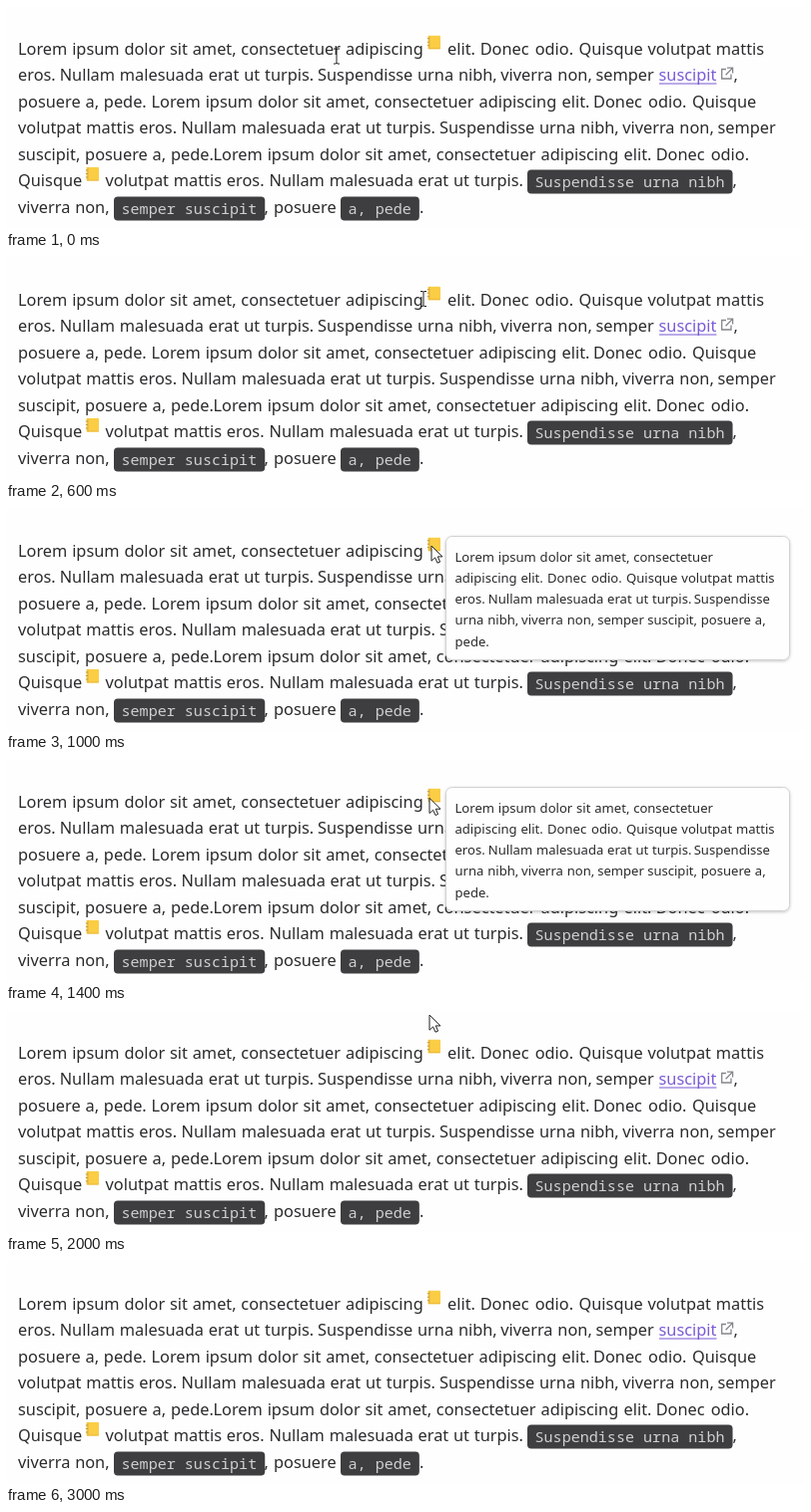
Recreate the animation shown at these times as an HTML page. Size 800 by 224 pixels, loop 3.2 s.

```html
<!DOCTYPE html>
<html lang="la">
<head>
<meta charset="utf-8">
<style>
  html, body { margin: 0; width: 100%; height: 100%; overflow: hidden; background: #fefefe; }
  svg { display: block; width: 800px; height: 224px; }
  text { white-space: pre; }
  .body { font: 16.34px "Noto Sans", "Open Sans", sans-serif; word-spacing: .57px; fill: #2b2b2d; }
  .link { fill: #7b5bd6; }
  .code { font: 15.08px "Noto Sans Mono", "DejaVu Sans Mono", monospace; fill: #d0d0d2; }
  .tip { font: 13.07px "Noto Sans", "Open Sans", sans-serif; word-spacing: .46px; fill: #2b2b2d; }
</style>
</head>
<body>
<svg viewBox="0 0 800 224" xmlns="http://www.w3.org/2000/svg">
  <defs>
    <filter id="shadow" x="-10%" y="-10%" width="120%" height="125%">
      <feDropShadow dx="0" dy="1" stdDeviation="1.6" flood-color="#000" flood-opacity=".22"/>
    </filter>
    <g id="notebook">
      <rect x="1.5" width="12.5" height="13.5" rx=".8" fill="#facd45"/>
      <path d="M2 13H13.8" stroke="#eab83c"/>
      <path d="M3 .3V13.2" stroke="#e6b03a"/>
      <path d="M.8 3H3M.8 6.5H3M.8 10H3" stroke="#b59a62"/>
    </g>
  </defs>
  <rect width="800" height="224" fill="#fefefe"/>
  <g id="page"></g>
  <path d="M654 78H711.5" stroke="#7b5bd6" stroke-width="1.2"/>
  <path d="M721 63.5H716.7V73H726V68.5M722 62.2H727.6V67.6M727.4 62.4L720.6 69.2" fill="none" stroke="#85858a" stroke-width="1.3"/>
  <use href="#notebook" x="421" y="29.7"/>
  <use href="#notebook" x="79" y="162"/>
  <g id="tooltip">
    <rect x="440.5" y="28.5" width="344" height="124" rx="6" fill="#fefefe" stroke="#d2d2d4" filter="url(#shadow)"/>
  </g>
  <g id="ibeam" fill="none" stroke="#222">
    <path d="M-3 -7.5H-1L0 -6.7L1 -7.5H3M0 -6.7V6.7M-3 7.5H-1L0 6.7L1 7.5H3"/>
  </g>
  <path id="arrow" d="M0 0V15.2L3.6 11.9L6 17.2L8.6 16.1L6.3 10.9H11Z" fill="#fff" stroke="#222" stroke-width="1"/>
</svg>
<script>
const LOOP = 3200, STEP = 200;
const TIP_SCALE = 0.8;
const $ = id => document.getElementById(id);

function add(parent, tag, attrs, content = "") {
  const node = document.createElementNS("http://www.w3.org/2000/svg", tag);
  for (const key in attrs) node.setAttribute(key, attrs[key]);
  node.textContent = content;
  parent.append(node);
}

// Repeated phrases as runs of [offset, text]; at() moves one to its place.
const at = (x, phrase) => phrase.map(([offset, content]) => [x + offset, content]);
const lorem = [[0, "Lorem ipsum dolor sit amet,"], [223.3, "consectetuer"], [328, "adipiscing"]];
const loremElit = [...lorem, [411, "elit."]];
const donec = [[0, "Donec"], [55, "odio."]];
const nullam = [[0, "Nullam malesuada"], [149, "erat ut turpis."]];
const suspendisse = [[0, "Suspendisse"], [100, "urna nibh,"], [183.2, "viverra non,"], [278.4, "semper"]];

// Each line holds runs of [x, text, class].
const lines = [
  [...at(12, lorem), [442, "elit."], ...at(474.7, donec), [573.5, "Quisque volutpat mattis"]],
  [[12, "eros."], ...at(53.7, nullam), ...at(312, suspendisse), [653.5, "suscipit", "link"], [728.5, ","]],
  [[12, "posuere a, pede."], ...at(145.5, loremElit), ...at(588, donec), [687, "Quisque"]],
  [[12, "volutpat mattis eros."], ...at(175.5, nullam), ...at(434, suspendisse)],
  [[12, "suscipit, posuere a, pede."], ...at(207.5, loremElit), ...at(650.7, donec)],
  [[12, "Quisque"], [99.5, "volutpat mattis eros."], ...at(263.5, nullam),
   [529.5, "Suspendisse urna nibh", "code"], [727.5, ","]],
  [[12, "viverra non,"], [115.5, "semper suscipit", "code"], [258.5, ","],
   [268, "posuere"], [342.5, "a, pede", "code"], [414, "."]]
];

lines.forEach((runs, row) => {
  const baseline = 49 + Math.round(row * 26.45);
  for (const [x, content, kind = ""] of runs) {
    const isCode = kind === "code";
    const y = baseline + (isCode ? 1 : 0);
    if (isCode) {
      add($("page"), "rect", { x: x - 7.5, y: y - 17.5, width: content.length * 9.05 + 15.5, height: 24, rx: 4, fill: "#3e3e40" });
    }
    add($("page"), "text", { x, y, class: isCode ? "code" : "body " + kind }, content);
  }
});

// Tooltip offsets are in body size and scaled down together with the type.
const tipLines = [
  lorem.slice(0, 2),
  [[0, "adipiscing elit."], ...at(115.7, donec), [214.5, "Quisque volutpat mattis"]],
  [[0, "eros."], ...at(41.7, nullam), [299, "Suspendisse"]],
  [...at(-100, suspendisse.slice(1)), [240.8, "suscipit, posuere a,"]],
  [[0, "pede."]]
];

tipLines.forEach((runs, row) => {
  const y = 54 + Math.round(row * 21.15);
  for (const [x, content] of runs) {
    add($("tooltip"), "text", { x: 449.5 + x * TIP_SCALE, y, class: "tip" }, content);
  }
});

// Pointer keys: [step, x, y]; it leaves through the top edge after the last one.
const pointer = [[0, 331, 50.5], [1, 387, 48.5], [2, 411, 44], [3, 418, 42],
                 [4, 426, 37], [5, 426, 38], [8, 423, 40], [9, 422, 40], [10, 424, 5]];

function pointerAt(step) {
  const next = pointer.findIndex(key => key[0] >= step);
  if (next < 0) return null;
  const b = pointer[next], a = pointer[Math.max(0, next - 1)];
  const mix = b[0] === a[0] ? 1 : (step - a[0]) / (b[0] - a[0]);
  return [1, 2].map(i => a[i] + (b[i] - a[i]) * mix);
}

function show(node, visible) {
  node.setAttribute("visibility", visible ? "visible" : "hidden");
}

function render(time) {
  const step = Math.floor((time % LOOP) / STEP);
  const position = pointerAt(step);
  const overText = step < 4;
  show($("tooltip"), step >= 4 && step < 10);
  show($("ibeam"), position && overText);
  show($("arrow"), position && !overText);
  if (position) $(overText ? "ibeam" : "arrow").setAttribute("transform", `translate(${position})`);
}

const start = performance.now();
function tick() {
  render(performance.now() - start);
  requestAnimationFrame(tick);
}
tick();
</script>
</body>
</html>
```
